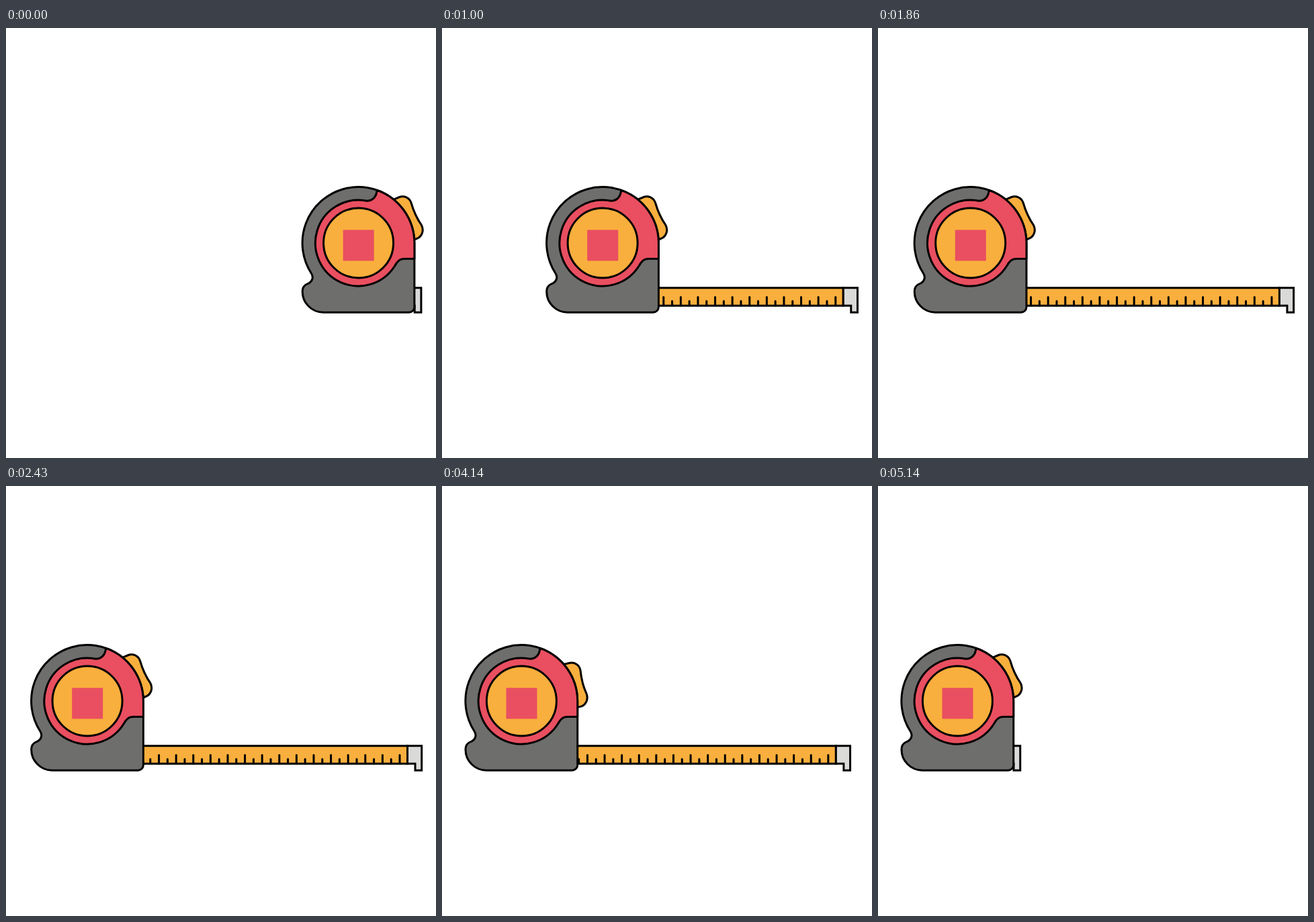
Recreate the animation shown at these times as an HTML page. Size 640 by 640 pixels, loop 6 s.

```html
<!DOCTYPE html>
<html lang="en">
<head>
<meta charset="utf-8">
<title>Tape measure</title>
<style>
  html, body { margin: 0; width: 100%; height: 100%; overflow: hidden; background: #fff; }
  svg { display: block; width: 100vw; height: 100vh; }
  .line { stroke: #000; stroke-width: 3; }
  .grey { fill: #6e6e6c; }
  .red { fill: #e94f60; }
  .orange { fill: #f9af3d; }
  .light { fill: #dadad9; }
</style>
</head>
<body>
<svg viewBox="0 0 640 640">
  <defs>
    <clipPath id="mouth"><rect x="150" y="370" width="490" height="70"/></clipPath>
  </defs>
  <g id="tool">
    <g clip-path="url(#mouth)">
      <g id="tape">
        <rect class="line orange" x="150" y="386.8" width="447.5" height="26.5"/>
        <path id="ticks" class="line" fill="none" stroke-linecap="round"/>
        <path class="line light" d="M597.5 386.8H618.7V423.2H609V413.3H597.5Z"/>
      </g>
    </g>
    <path id="button" class="line orange" d="M160 260L178.5 252C186 249 194 252 196.8 260C200.5 273 205 283 212 293C216.5 301 213 311 205 313.5L190 320Z"/>
    <path class="line grey" d="M201.7 320V415A8 8 0 0 1 193.7 423.2H66A31 31 0 0 1 35 392C35 387 37 383.5 41 381.5L44.5 379.8C50 377 51.8 370.5 48.1 365A83.4 83.4 0 1 1 201.7 320Z"/>
    <path class="line red" stroke-linejoin="round" d="M145.8 241.4C145.5 251 139 258.5 129 257A64 64 0 1 0 172.5 354C176 347.5 179.5 343.5 187 343.5H201.7V320A83.4 83.4 0 0 0 145.8 241.4Z"/>
    <circle class="line orange" cx="118.4" cy="320" r="52"/>
    <rect class="red" x="95.5" y="300.5" width="46" height="46"/>
  </g>
</svg>
<script>
  const LOOP = 6000, FPS = 14;
  const TRAVEL = 406.2, LENGTH = 407;
  const $ = id => document.getElementById(id);
  const tool = $('tool'), tape = $('tape'), button = $('button');
  const clamp = x => Math.min(1, Math.max(0, x));

  let marks = '';
  for (let i = 0; i < 31; i++) {
    marks += `M${586 - i * 12.8} ${i % 2 ? 406.5 : 400.5}V413`;
  }
  $('ticks').setAttribute('d', marks);

  // Pull to the left: [step, distance, speed per step]
  const PULL = [
    [0, 0, 0], [8, 153, 21.5], [9, 174.5, 22], [18, 343.5, 7.5],
    [20, 356.5, 6], [27, 390.5, 3.3], [34, 403.5, 1.2], [39, TRAVEL, 0]
  ];

  // Cubic Hermite curve through the keys
  function follow(keys, s) {
    const i = keys.findIndex(k => k[0] > s);
    if (i < 0) return keys[keys.length - 1][1];
    const [s0, y0, v0] = keys[i - 1], [s1, y1, v1] = keys[i];
    const d = s1 - s0, u = (s - s0) / d, w = 1 - u;
    return y0 * (1 + 2 * u) * w * w + y1 * u * u * (3 - 2 * u)
      + d * u * w * (v0 * w - v1 * u);
  }

  function snapBack(s) {
    const k = 7.5, p = clamp((s - 50) / 15.3);
    return (Math.exp(k * p) - 1) / (Math.exp(k) - 1);
  }

  // Recoil when the hook hits the case
  function tilt(s) {
    if (s <= 65 || s >= 72) return 0;
    return s < 67
      ? -13 * Math.sin((s - 65) / 2 * Math.PI / 2)
      : -6.5 * (1 + Math.cos((s - 67) / 5 * Math.PI));
  }

  function draw(s) {
    const pulled = follow(PULL, s);
    const out = LENGTH * (pulled / TRAVEL - snapBack(s));
    const press = s >= 50 && s < 61 ? 10 : 0;
    tool.setAttribute('transform', `translate(${TRAVEL - pulled}) rotate(${tilt(s)} 35 424)`);
    tape.setAttribute('transform', `translate(${out - LENGTH})`);
    button.setAttribute('transform', `rotate(${press} 118.4 320)`);
  }

  const start = performance.now();
  function tick() {
    const t = (performance.now() - start) % LOOP;
    draw(Math.floor((t + 5) * FPS / 1000) % (LOOP * FPS / 1000));
    requestAnimationFrame(tick);
  }
  draw(0);
  requestAnimationFrame(tick);
</script>
</body>
</html>
```
